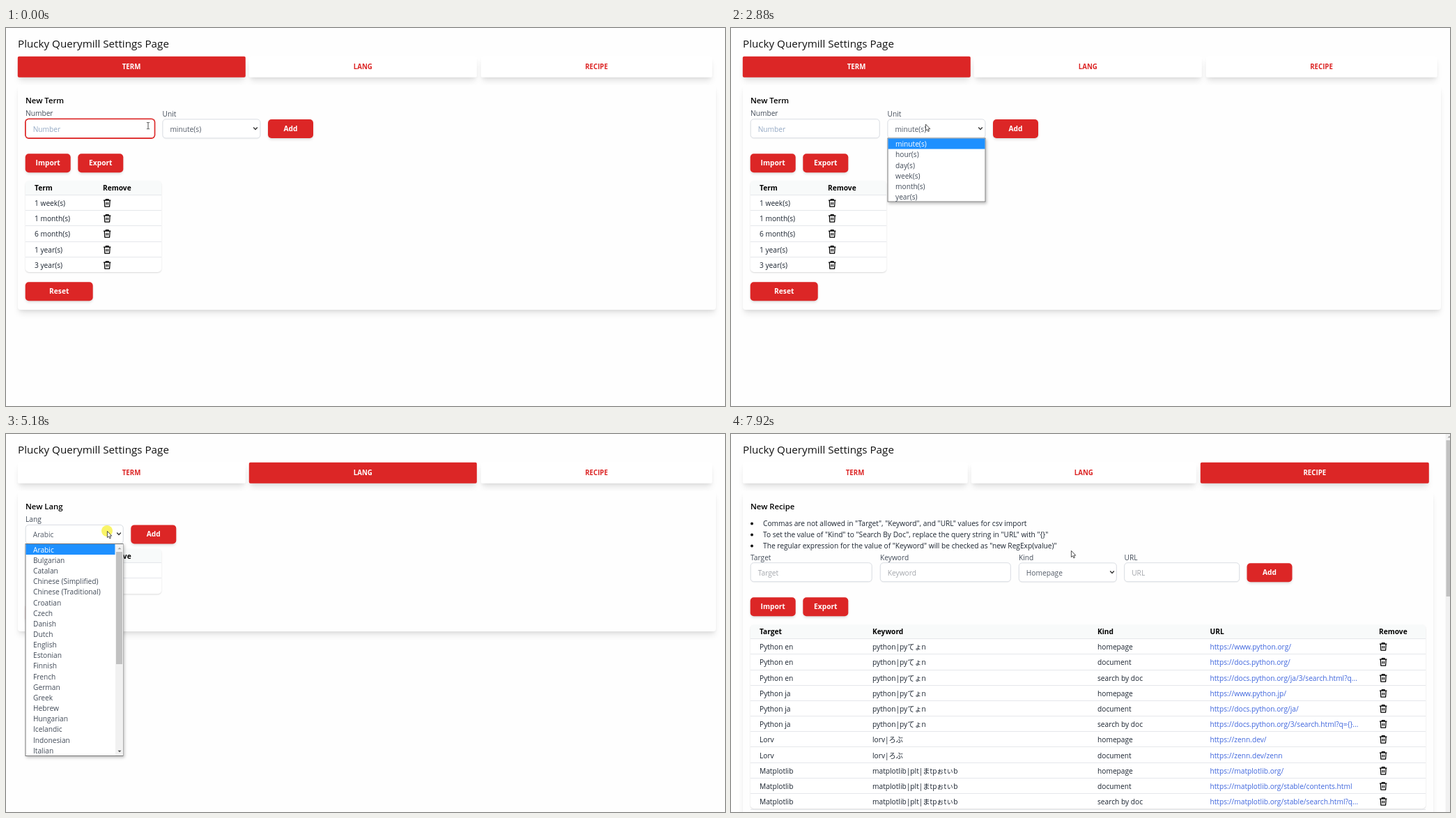
Recreate the animation shown at these times as an HTML page. Size 1032 by 542 pixels, loop 8 s.

```html
<!DOCTYPE html>
<html lang="en">
<head>
<meta charset="utf-8">
<title>Settings page</title>
<style>
html, body { margin: 0; width: 100%; height: 100%; overflow: hidden; background: #fefefe; }
#stage { position: relative; width: 1032px; height: 542px; overflow: hidden;
  font: 10.2px "Open Sans", "Noto Sans CJK JP", "Noto Sans CJK", sans-serif; color: #1b2430; }
#stage div, #stage svg { position: absolute; box-sizing: border-box; white-space: pre; }
#stage svg { overflow: visible; fill: none; }
[hidden] { display: none !important; }
.text { line-height: 0; }
.title { font-size: 15.2px; color: #111; }
.heading { font-size: 11.3px; font-weight: 600; color: #000; }
.head { font-weight: 700; color: #000; }
.label, .item { color: #434c59; }
.value { color: #545c68; }
.link { color: #3f66dd; }
.hint { color: #94a9c4; }
.recipe .hint { color: #a3a6ab; }
.tab { font-size: 9.7px; font-weight: 700; text-align: center; color: #dc2626; background: #fff; border-radius: 2px; }
.tab, .panel { box-shadow: 0 7px 10px -2px #0000001a, 0 3px 4px -1px #0000000d; }
.tab.on, .button { background: #dc2626; color: #fff; }
.panel { background: #fefefe; border-radius: 4px; }
.button { font-weight: 700; text-align: center; border-radius: 5px;
  box-shadow: 0 3px 4px -1px #0000001a, 0 1px 3px #0000000f; }
.field { background: #fff; border: 1px solid #d9dde3; border-radius: 5px; box-shadow: 0 1px 1px #0000000a; }
.field.focus { border-color: #dc2626; box-shadow: 0 0 0 .7px #dc2626; }
.table { background: #fff; border-radius: 5px; overflow: hidden; box-shadow: 0 1px 2px #00000026; }
.table-head { background: #f8fafa; }
.line { background: #e5e7eb; }
.menu { background: #fff; border: 1px solid #777; box-shadow: 1px 2px 4px #00000040; }
.picked { background: #1e90ff; }
.white { color: #fff; }
.track { background: #f1f1f1; }
.thumb { background: #c1c1c1; }
.dot { border-radius: 50%; background: #111; }
#caret { background: #222; }
#glow { width: 16px; height: 16px; margin: -8px; border-radius: 50%; background: #f9f468; mix-blend-mode: multiply; }
#cursor { left: 0; top: 0; width: 1px; height: 1px; }
</style>
</head>
<body>
<div id="stage"></div>
<script>
// Translating keeps fractional edges soft instead of snapping them to pixels
const box = (cls, x, y, w, h, body = '') => `<div class="${cls}" style="left:0;top:0;` +
  `transform:translate(${x}px,${y}px);width:${w}px;height:${h}px;line-height:${h}px">${body}</div>`;
const text = (x, y, str, cls = '') => `<div class="text ${cls}" style="left:${x}px;top:${y}px">${str}</div>`;
const icon = (x, y, d, attrs) =>
  `<svg width="1" height="1" style="left:${x}px;top:${y}px"><path d="${d}" ${attrs}/></svg>`;
const layer = (id, body, cls = '') => `<div id="${id}" class="${cls}">${body}</div>`;

const trash = (x, y) => icon(x, y - 5.5,
  'M0 2.2H10.4M3.3 2V.5H7.1V2M1.3 2.4L1.8 11H8.6L9.1 2.4M4 4.8V8.6M6.4 4.8V8.6',
  'stroke="#000" stroke-width="1.25" stroke-linejoin="round"');
const chevron = (x, y) => icon(x, y, 'M-2.8-1.4L0 1.4 2.8-1.4', 'stroke="#333" stroke-width="1.4"');
const button = (x, y, label, w = 65) => box('button', x, y, w, 27, label);
const input = (x, y, w, hint) => box('field', x, y, w, 28) + text(x + 11, y + 14.5, hint, 'hint');
const select = (x, y, value) =>
  box('field', x, y, 141, 28) + text(x + 11, y + 14.5, value, 'value') + chevron(x + 134, y + 13.5);

const tabs = (active, edges) => ['TERM', 'LANG', 'RECIPE'].map((name, i) =>
  box(name === active ? 'tab on' : 'tab', edges[i][0], 40.7, edges[i][1] - edges[i][0], 30, name)).join('');
const wideTabs = [[16.8, 343.3], [348.8, 675.8], [681.7, 1013.3]];
const narrowTabs = [[16.8, 339.3], [344.8, 667.8], [673.8, 1001.8]];

function table(y, w, cols, head, rows) {
  const top = y + 20.5, step = 22.18;
  let out = box('table', 28, y, w, 20.5 + rows.length * step, box('table-head', 0, 0, w, 20.5));
  head.forEach((name, c) => out += text(cols[c], y + 10.2, name, 'head'));
  rows.forEach((row, r) => {
    const mid = top + r * step + 11.6;
    out += box('line', 28, Math.round(top + r * step - .5), w, 1);
    row.forEach((cell, c) => out += text(cols[c], mid, cell, cell.startsWith('http') ? 'link' : ''));
    out += trash(cols.at(-1) + 1, mid - .5);
  });
  return out;
}

function scrollbar(x, y, h, thumb) {
  return box('track', x, y, 11, h) + box('thumb', x + 1, y + 11, 9, thumb) +
    icon(x + 5.5, y + 6, 'M-2.5 1.3L0-1.3 2.5 1.3z', 'fill="#a3a3a3"') +
    icon(x + 5.5, y + h - 6, 'M-2.5-1.3L0 1.3 2.5-1.3z', 'fill="#505050"');
}

const menu = (x, y, h, width, items) => box('menu', x, y, 141, h) +
  box('picked', x + 1, y + 1, width, 15) +
  items.map((s, i) => text(x + 11.5, y + 8.7 + i * 15.16, s, i ? 'item' : 'white')).join('');

const termView = tabs('TERM', wideTabs) + box('panel', 17, 82, 1001.5, 322) +
  text(28, 104, 'New Term', 'heading') + text(28, 122, 'Number', 'label') + text(224.5, 123, 'Unit', 'label') +
  input(27.7, 130.2, 186, 'Number') + select(224.4, 130.4, 'minute(s)') + button(376, 131, 'Add') +
  button(27.7, 180.2, 'Import') + button(103.3, 180.2, 'Export') +
  table(219, 195, [41, 139], ['Term', 'Remove'],
    ['1 week(s)', '1 month(s)', '6 month(s)', '1 year(s)', '3 year(s)'].map(s => [s])) +
  button(27.7, 364.2, 'Reset', 97) + '<div id="caret" style="left:39px;top:137px;width:1px;height:15px"></div>';

const langView = tabs('LANG', wideTabs) + box('panel', 17, 82, 1001.5, 201) +
  text(28, 104, 'New Lang', 'heading') + text(28, 122, 'Lang', 'label') +
  select(27.7, 129.8, 'Arabic') + button(179.3, 130.4, 'Add') +
  table(164.3, 195, [41, 139], ['Lang', 'Remove'], [['English'], ['Japanese']]) +
  button(27.7, 242.7, 'Reset', 97);

const notes = [
  'Commas are not allowed in "Target", "Keyword", and "URL" values for csv import',
  'To set the value of "Kind" to "Search By Doc", replace the query string in "URL" with "{}"',
  'The regular expression for the value of "Keyword" will be checked as "new RegExp(value)"'];
const kinds = ['homepage', 'document', 'search by doc'];
const recipes = [
  ['Python en', 'python|pyてょn', 'www.python.org/', 'docs.python.org/', 'docs.python.org/ja/3/search.html?q...'],
  ['Python ja', 'python|pyてょn', 'www.python.jp/', 'docs.python.org/ja/', 'docs.python.org/3/search.html?q={}...'],
  ['Lorv', 'lorv|ろぶ', 'zenn.dev/', 'zenn.dev/zenn'],
  ['Matplotlib', 'matplotlib|plt|まtpぉtぃb', 'matplotlib.org/', 'matplotlib.org/stable/contents.html',
    'matplotlib.org/stable/search.html?q...'],
].flatMap(([target, keyword, ...urls]) => urls.map((url, i) => [target, keyword, kinds[i], 'https://' + url]));

const recipeView = tabs('RECIPE', narrowTabs) + box('panel', 17, 82, 991, 600) +
  text(28, 104, 'New Recipe', 'heading') +
  notes.map((s, i) => box('dot', 28, 126.5 + i * 16, 4, 4) + text(46, 128 + i * 16, s)).join('') +
  [[28, 'Target'], [214, 'Keyword'], [413, 'Kind'], [564.5, 'URL']].map(([x, s]) => text(x, 176.6, s, 'label')).join('') +
  input(27.7, 184.2, 175, 'Target') + input(213.8, 184.2, 188, 'Keyword') + select(412.8, 184.4, 'Homepage') +
  input(564.2, 184.2, 166, 'URL') + button(740.5, 185.2, 'Add') +
  button(27.7, 234.2, 'Import') + button(103.3, 234.2, 'Export') +
  table(273.2, 969, [41, 203, 526, 687.5, 930], ['Target', 'Keyword', 'Kind', 'URL', 'Remove'], recipes) +
  box('line', 28, 538, 969, 1) + scrollbar(1025.5, -2, 600, 224);

const languages = ('Arabic,Bulgarian,Catalan,Chinese (Simplified),Chinese (Traditional),Croatian,Czech,Danish,Dutch,' +
  'English,Estonian,Finnish,French,German,Greek,Hebrew,Hungarian,Icelandic,Indonesian,Italian').split(',');
const units = ['minute(s)', 'hour(s)', 'day(s)', 'week(s)', 'month(s)', 'year(s)'];

const stage = document.getElementById('stage');
stage.innerHTML = text(17, 22, 'Plucky Querymill Settings Page', 'title') +
  layer('term', termView) + layer('lang', langView) + layer('recipe', recipeView, 'recipe') +
  layer('termMenu', menu(224.5, 157.5, 92, 139, units)) +
  layer('langMenu', menu(27.5, 157, 305, 128, languages) + scrollbar(157, 158, 303, 161)) +
  '<div id="glow"></div><svg id="cursor"><path stroke-linejoin="round"/></svg>';

const el = id => document.getElementById(id);
const numberField = stage.querySelector('#term .field');
const cursorPath = stage.querySelector('#cursor path');
const shapes = {
  beam: 'M-2-4.5H-.6L0-4 .6-4.5H2M0-4V4.2M-2 4.7H-.6L0 4.2 .6 4.7H2',
  arrow: 'M.4.4V9.6L2.5 7.7 3.9 10.9 5.4 10.2 4 7.1H6.8Z',
  hand: 'M-1 7V1A.9.9 0 0 1 .8 1V4.6L4 5.3Q5 5.6 4.9 6.8L4.2 11.8H-.8L-3.8 8Q-3.7 6.6-2.5 6.9L-1 8ZM.8 4.6V6.4M2.4 5V6.6M3.7 5.3V6.8',
};

// Pointer path: time, x, y
const path = [
  [690, 204, 140], [1160, 253, 143.5], [1410, 274, 141], [2820, 274, 141], [3330, 402, 55], [3480, 404, 60],
  [4110, 404, 60], [4330, 193, 103], [4500, 193, 103], [5100, 145, 139], [6000, 145, 139], [6340, 431, 85],
  [6540, 431, 85], [6760, 676, 57], [6850, 676, 57], [7130, 737, 52], [7720, 737, 52], [7920, 488, 167]];
const clicks = [[1700, 1790], [3700, 3800], [5180, 5270], [7440, 7530]];

function pointerAt(t) {
  const i = path.findIndex(p => p[0] > t);
  if (i < 1) return (i ? path.at(-1) : path[0]).slice(1);
  const [a, b] = [path[i - 1], path[i]];
  const u = (t - a[0]) / (b[0] - a[0]), k = u * u * (3 - 2 * u);
  return [a[1] + (b[1] - a[1]) * k, a[2] + (b[2] - a[2]) * k];
}

function draw() {
  const t = performance.now() % 8000;
  const show = (id, on) => el(id).hidden = !on;
  show('term', t < 3800);
  show('lang', t >= 3800 && t < 7530);
  show('recipe', t >= 7530);
  show('termMenu', t >= 1700 && t < 3700);
  show('langMenu', t >= 5180 && t < 7440);
  show('caret', t < 1700 && t >= 230 && Math.floor((t - 230) / 530) % 2 === 0);
  numberField.classList.toggle('focus', t < 1700);

  const [x, y] = pointerAt(t);
  const kind = t < 1000 && x < 214 ? 'beam' : y < 71 ? 'hand' : 'arrow';
  cursorPath.setAttribute('d', shapes[kind]);
  cursorPath.setAttribute('transform', `translate(${x} ${y})`);
  cursorPath.setAttribute('fill', kind === 'beam' ? 'none' : '#fff');
  cursorPath.setAttribute('stroke', '#333');
  cursorPath.setAttribute('stroke-width', .85);
  show('glow', clicks.some(([from, to]) => t >= from && t < to));
  el('glow').style.left = x + 'px';
  el('glow').style.top = y + 'px';
  requestAnimationFrame(draw);
}
draw();
</script>
</body>
</html>
```
